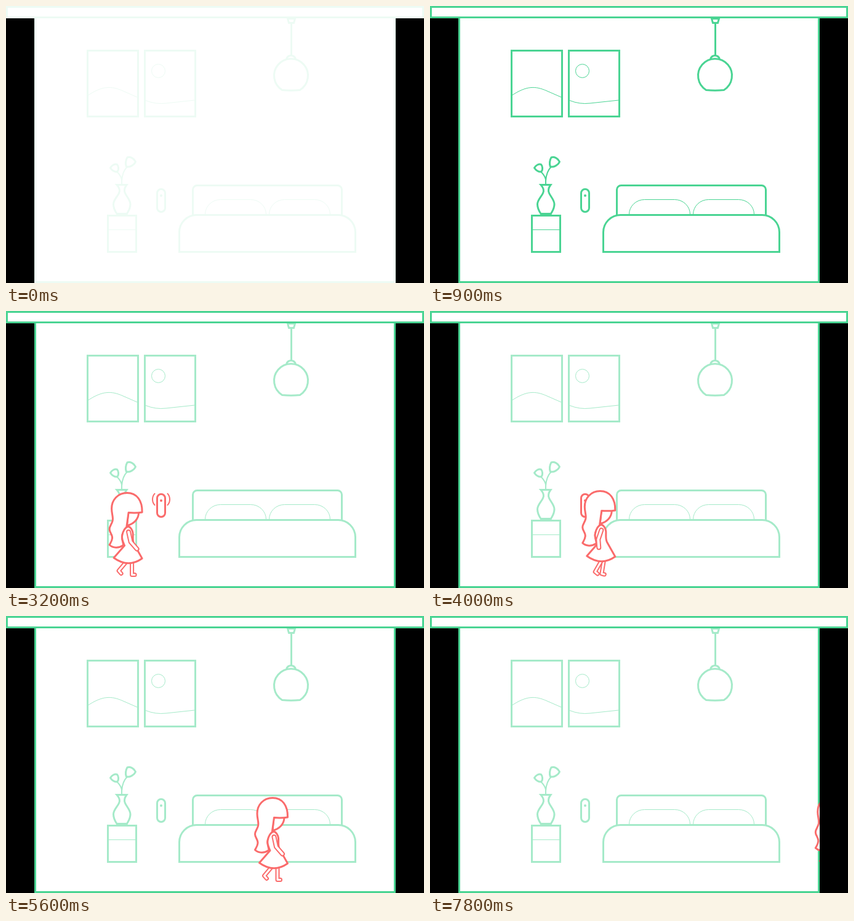
These frames come from a looping animation (679 by 450 pixels, 7.9 s). An HTML page with a canvas:

```html
<!DOCTYPE html>
<html lang="en">
<head>
<meta charset="utf-8">
<title>Motion sensor in a bedroom</title>
<style>
  html, body { margin: 0; width: 100%; height: 100%; overflow: hidden; background: #000; }
  canvas { display: block; }
</style>
</head>
<body>
<canvas id="stage" width="679" height="450"></canvas>
<script>
const ctx = document.getElementById('stage').getContext('2d');
const LOOP = 7900, TICK = 100, STEP = 300;
const GREEN = [74, 212, 147], RED = [250, 107, 107], WHITE = [255, 255, 255];

const clamp = v => Math.min(1, Math.max(0, v));
const ramp = (t, from, to) => clamp((t - from) / (to - from));
const lerp = (a, b, k) => a + (b - a) * k;
const mix = (a, b, k) => a.map((v, i) => lerp(v, b[i], k));
const css = c => `rgb(${c.map(Math.round).join(',')})`;

// [time, left edge of the girl]
const WALK = [[1400, -13], [2200, 67], [4700, 316], [6800, 519], [7000, 543], [7900, 635]];

const POSES = {
  legBack: [[30, 406], [16.5, 422], [20.5, 426.5]],
  legFront: [[38, 406], [38, 428.5], [42.5, 428.5]],
  armFront: [[32.5, 359], [36, 375], [46, 386.5]],
  armBack: [[32, 359], [24, 374], [22, 387.5]],
  farArmBack: [[32, 359], [27, 374], [26, 385]]
};

const HAIR = new Path2D('M54.5 327C55 308 46 295.5 30 295.5C15 295.5 5 307 5 321' +
  'C5 330 8 335 6.5 341C5 347 1.5 349 1.5 354.5C1.5 360 6.5 363 6 369' +
  'C5.5 374 3 377 1.5 380C8 386 17 385 24 380.5C24 376 21 371 22 365' +
  'C23 358 30 355 29.5 349L32.5 327.5Q44 328.5 54.5 327Z');
const FACE = new Path2D('M49 327C49 338 41 346 30 348.5L32 327Z');
const DRESS = new Path2D('M32 350C36 351 39 356 39.5 361C40 367 38.5 372 41 378L54.5 402' +
  'Q32 418 8.5 401L26 381C24 376 21 371 22 365C23 358 27 351 32 350Z');

const VASE = new Path2D('M180 290.5H196C192 296 191.5 300 193.5 304C196 310 202 315 202 322' +
  'C202 329 199 333 196.5 337.5H180C177 333 174.5 329 174.5 322C174.5 315 181 310 183.5 304' +
  'C185.5 300 185 296 180 290.5Z');
const STEMS = new Path2D('M188 290V282C187 276 183 272 179.5 268.5M188 284C188.5 275 191 267 197 261');
const PETALS = new Path2D('M169.5 263C172 258.5 177 256 180.5 257.5C183 260 183.5 266 181 269' +
  'C177 270.5 172 267 169.5 263ZM210.5 253C208 247.5 202 244.5 197 246' +
  'C194.5 250 193.5 257 195.5 261C201 262.5 208 258.5 210.5 253Z');
const LAMP = new Path2D('M457.5 20.5H469.5L467.5 27.5H459.5ZM463.5 28V80' +
  'M455.5 86C457 82 460 80.5 463 80.5C466 80.5 469 82 470.5 86' +
  'M448.5 136.5A27.5 27.5 0 1 1 477.5 136.5Q463 138 448.5 136.5Z');
const BED = new Path2D('M303.5 339.5V298.5A7 7 0 0 1 310.5 291.5H538.5A7 7 0 0 1 545.5 298.5V339.5' +
  'M281.5 399.5V367.5A28 28 0 0 1 309.5 339.5H539.5A28 28 0 0 1 567.5 367.5V399.5Z');
const THIN = new Path2D('M134 144.5C156 130.5 170 129 190 138L214 148.5' +
  'M227 153.5Q243 160 260 158L306.5 153V179M258.5 105.5A11 11 0 1 1 236.5 105.5A11 11 0 1 1 258.5 105.5' +
  'M167 363.5H211' +
  'M323.5 338.5A25 24 0 0 1 348.5 314.5H397.5A25 24 0 0 1 422.5 338.5' +
  'M427.5 338.5A25 24 0 0 1 452.5 314.5H501.5A25 24 0 0 1 526.5 338.5');

function line(path, width) {
  ctx.lineWidth = width;
  ctx.stroke(path);
}

function outline(path, width) {
  ctx.fill(path);
  line(path, width);
}

function box(x, y, w, h) {
  ctx.lineWidth = 3;
  ctx.strokeRect(x, y, w, h);
}

function drawFurniture(color) {
  ctx.strokeStyle = css(color);
  ctx.fillStyle = '#fff';
  ctx.lineJoin = 'miter';
  box(132.5, 72.5, 82, 107);
  box(225.5, 72.5, 82, 107);
  box(165.5, 340.5, 46, 59);
  line(THIN, 1);
  line(LAMP, 3);
  line(BED, 3);
  line(STEMS, 2);
  ctx.lineJoin = 'round';
  outline(PETALS, 3);
  ctx.lineJoin = 'miter';
  outline(VASE, 3);
}

function drawSensor(t, color) {
  ctx.strokeStyle = ctx.fillStyle = css(color);
  ctx.lineWidth = 3;
  ctx.beginPath();
  ctx.roundRect(245.5, 297.5, 13, 37, 6.5);
  ctx.stroke();
  ctx.beginPath();
  ctx.arc(252, 308, 2, 0, Math.PI * 2);
  ctx.fill();

  if (t < 2000 || t >= 4700) return;
  const waves = Math.floor(((t - 2000) % 900) / 225);
  ctx.lineWidth = 2;
  for (let i = 1; i <= waves; i++) {
    for (const side of [0, Math.PI]) {
      ctx.beginPath();
      ctx.arc(252, 306, 14 * (i + 1) / 2, side - 0.78, side + 0.78);
      ctx.stroke();
    }
  }
}

function limb(from, to, k, width, lift) {
  ctx.beginPath();
  from.forEach(([x, y], i) => ctx.lineTo(lerp(x, to[i][0], k), lerp(y, to[i][1], k) - lift));
  ctx.lineCap = ctx.lineJoin = 'round';
  for (const [color, w] of [[RED, width], [WHITE, width - 4]]) {
    ctx.strokeStyle = css(color);
    ctx.lineWidth = w;
    ctx.stroke();
  }
  ctx.lineCap = 'butt';
}

function walkX(t) {
  const i = WALK.findIndex(key => key[0] > t);
  const [a, b] = [WALK[i - 1], WALK[i]];
  return lerp(a[1], b[1], ramp(t, a[0], b[0]));
}

function drawGirl(t) {
  const phase = Math.PI * (t - 3200) / STEP;
  const swing = (1 - Math.cos(phase)) / 2;
  const bob = 3.5 * Math.abs(Math.sin(phase));
  const { legBack, legFront, armFront, armBack, farArmBack } = POSES;

  ctx.save();
  ctx.beginPath();
  ctx.rect(46, 20, 587, 430);
  ctx.clip();
  ctx.translate(walkX(t), 0);
  limb(farArmBack, armFront, swing, 8, bob);
  limb(legBack, legFront, swing, 7, 0);
  limb(legFront, legBack, swing, 7, 0);

  ctx.translate(0, -bob);
  ctx.strokeStyle = css(RED);
  ctx.fillStyle = '#fff';
  ctx.lineJoin = 'round';
  outline(FACE, 3);
  outline(HAIR, 3);
  outline(DRESS, 3);
  limb(armFront, armBack, swing, 8, 0);
  ctx.restore();
}

function draw(t) {
  ctx.fillStyle = '#000';
  ctx.fillRect(0, 0, 679, 450);
  ctx.fillStyle = '#fff';
  ctx.fillRect(46, 20, 587, 430);

  const shell = mix(WHITE, GREEN, clamp((t + 100) / 1000));
  const furniture = mix(shell, WHITE, 0.5 * ramp(t, 1400, 1900));
  const alert = ramp(t, 2000, 2300) - ramp(t, 4700, 5100);

  ctx.strokeStyle = css(shell);
  box(47.5, 18.5, 584, 430);
  drawFurniture(furniture);
  drawSensor(t, mix(furniture, RED, alert));
  if (t >= 1400) drawGirl(t);

  ctx.fillStyle = '#fff';
  ctx.fillRect(0, 0, 679, 20);
  ctx.strokeStyle = css(shell);
  ctx.lineJoin = 'miter';
  box(1.5, 1.5, 676, 17);
}

const start = performance.now();
function frame() {
  const t = (performance.now() - start) % LOOP;
  draw(Math.floor(t / TICK) * TICK);
  requestAnimationFrame(frame);
}
frame();
</script>
</body>
</html>
```
